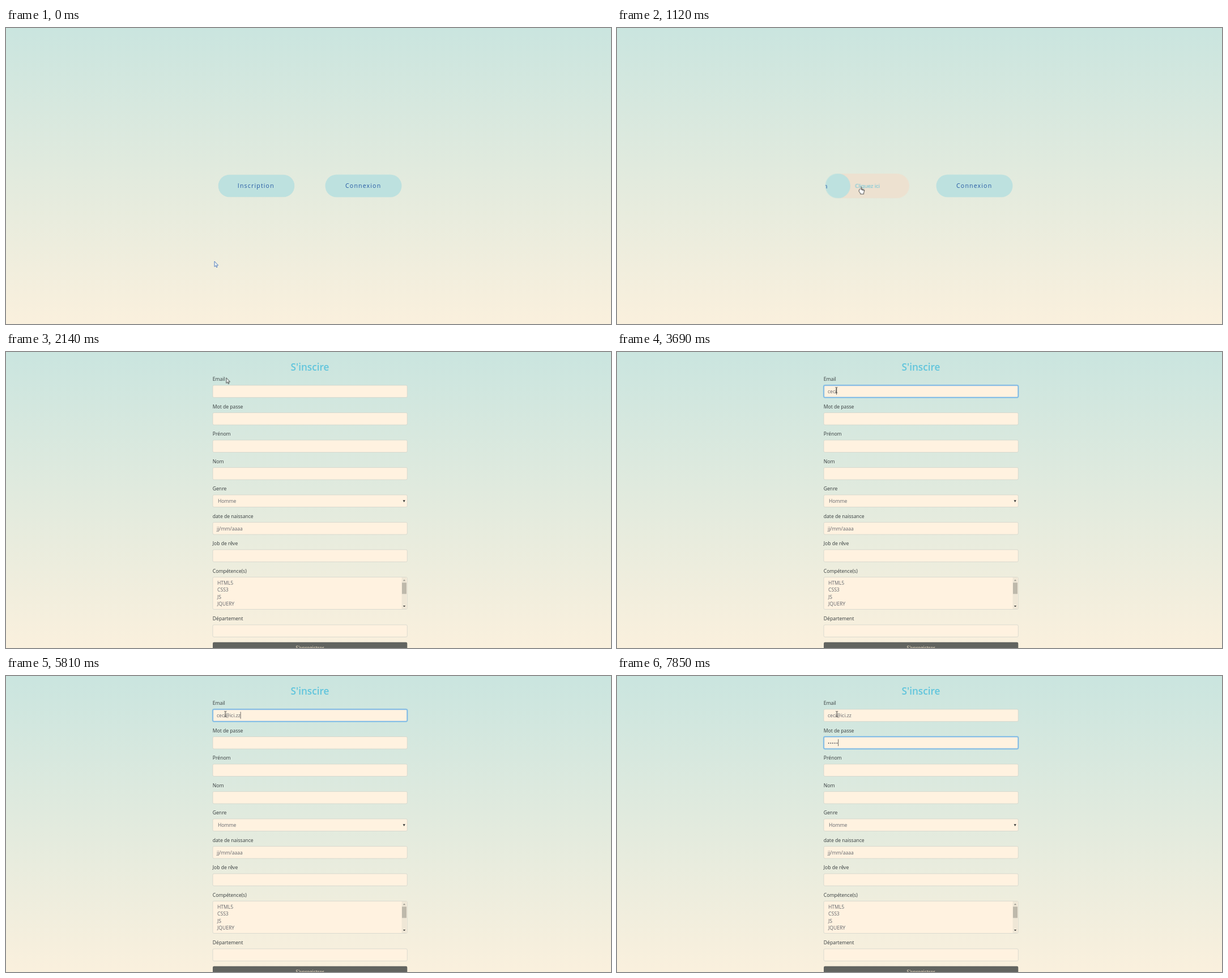
These frames come from a looping animation (1068x524 px, 8 s). An HTML page:

```html
<!DOCTYPE html>
<html lang="fr">
<head>
<meta charset="utf-8">
<title>Inscription</title>
<style>
  html, body { margin: 0; width: 100%; height: 100%; overflow: hidden; }
  body { background: linear-gradient(#cae5df, #faf0dd); }
  svg { display: block; width: 1068px; height: 524px; font: 8.6px "Open Sans", "Noto Sans", sans-serif; }

  #landing, #form, #arrow, #hand, #beam, #pointer { animation: 8s step-end infinite; }
  #landing { animation-name: leave; }
  #form { animation-name: enter; }
  @keyframes leave { 0% { opacity: 1 } 26.75%, 100% { opacity: 0 } }
  @keyframes enter { 0% { opacity: 0 } 26.75%, 100% { opacity: 1 } }

  .pill { fill: #bde1df; }
  .action { font-size: 10.6px; letter-spacing: 1.15px; fill: #2459a4; }
  .prompt { font-size: 8.9px; letter-spacing: -.12px; fill: #5fc4dc; text-anchor: middle; }
  #hover { transform-origin: 442px 279.5px; animation: grow 8s infinite; }
  #cover { animation: slide 8s infinite; }
  @keyframes grow {
    0%, 8.875% { transform: scale(1); animation-timing-function: ease }
    13.875%, 100% { transform: scale(1.1) }
  }
  @keyframes slide {
    0%, 8.875% { transform: translateX(0); animation-timing-function: ease }
    21.375%, 100% { transform: translateX(-136px) }
  }

  #pointer { animation-name: travel; }
  #arrow { animation-name: arrow; }
  #hand { animation-name: hand; }
  #beam { animation-name: beam; }
  @keyframes travel {
    0% { transform: translate(368px, 413px) }
    3.25% { transform: translate(368px, 413px); animation-timing-function: ease-in }
    8.75% { transform: translate(425px, 297px); animation-timing-function: ease-out }
    13.125% { transform: translate(431px, 281.5px) }
    23.75% { transform: translate(418px, 205px) }
    24.875% { transform: translate(399px, 100px) }
    26% { transform: translate(388.8px, 45.6px) }
    28.75% { transform: translate(387.3px, 57.5px) }
    30.75% { transform: translate(387.3px, 62.3px) }
    81.625%, 100% { transform: translate(388.1px, 62.3px) }
  }
  @keyframes arrow {
    0% { opacity: 1; stroke: #3464b4 }
    8.875% { opacity: 0; stroke: #222 }
    23.75% { opacity: 1; stroke: #222 }
    28.75%, 100% { opacity: 0; stroke: #222 }
  }
  @keyframes hand { 0% { opacity: 0 } 8.875% { opacity: 1 } 23.75%, 100% { opacity: 0 } }
  @keyframes beam { 0% { opacity: 0 } 28.75%, 100% { opacity: 1 } }

  .title { font-size: 17.2px; font-weight: 600; fill: #61c5dc; text-anchor: middle; }
  .label { fill: #343a3c; }
  .value { fill: #61646a; }
  .box { fill: #fff2e0; stroke: #cdd2c9; stroke-width: .7; }
  .ring { fill: none; stroke: #3d9bea; stroke-opacity: .38; stroke-width: 2.4; }
  .edge { fill: none; stroke: #72b5e9; stroke-width: 1; }
  .dots { letter-spacing: .43px; }
</style>
</head>
<body>
<svg viewBox="0 0 1068 524">
  <defs>
    <clipPath id="pillClip"><rect x="374.5" y="259.5" width="135" height="40" rx="20"/></clipPath>
  </defs>

  <g id="landing">
    <g id="hover">
      <g clip-path="url(#pillClip)">
        <rect x="374.5" y="259.5" width="135" height="40" rx="20" fill="#ede1d0"/>
        <text class="prompt" x="442" y="282.7">Cliquez ici</text>
        <g id="cover">
          <rect class="pill" x="374.5" y="259.5" width="135" height="40" rx="20"/>
          <text class="action" x="408.8" y="283.4">Inscription</text>
        </g>
      </g>
    </g>
    <rect class="pill" x="563.5" y="259.5" width="135" height="40" rx="20"/>
    <text class="action" x="599" y="283.4">Connexion</text>
  </g>

  <g id="form">
    <text class="title" x="536.5" y="33.2">S'inscire</text>
    <g id="rows"></g>
    <path d="M700.6 262.3h4.2l-2.1 3.8z" fill="#333"/>
    <g id="skills"></g>
    <rect x="698.5" y="399" width="9" height="56" fill="#efe7d6"/>
    <rect x="699" y="408.3" width="8" height="20" fill="#beb9ab"/>
    <path d="M700.8 405.2h4.4l-2.2-2.4z" fill="#99968c"/>
    <path d="M700.8 448.9h4.4l-2.2 2.4z" fill="#333"/>
    <rect x="365" y="513.8" width="343.3" height="22" rx="2.2" fill="#626460"/>
    <text x="536.5" y="527" text-anchor="middle" fill="#fbecd0">S'enregistrer</text>
    <g id="typing"></g>
  </g>

  <g id="pointer">
    <path id="arrow" d="M0 0V9.6L2.2 7.6 3.6 10.8 5 10.2 3.7 7.1H6.6Z" fill="#eef4f2" stroke-width=".8"/>
    <path id="hand" d="M-1 .8Q0-.6 1 .8V5L4.4 5.6Q5.6 5.9 5.4 7.2L4.6 10.4V12.4H-1.4V11L-4 7.6Q-4-.1 6.4 6-2.6 6.2L-1 7.6Z" fill="#fff" stroke="#222" stroke-width=".8"/>
    <path id="beam" d="M-2 .3Q0 .3 0 1.3V9Q0 10 2 10M2 .3Q0 .3 0 1.3M-2 10Q0 10 0 9" fill="none" stroke="#333" stroke-width=".9"/>
  </g>
</svg>
<script>
  const LOOP = 8000, BLINK = 550, PITCH = 48.5, TOP = 59;

  function add(parent, tag, attrs, text = '') {
    const node = document.createElementNS('http://www.w3.org/2000/svg', tag);
    for (const name in attrs) node.setAttribute(name, attrs[name]);
    node.textContent = text;
    return document.getElementById(parent).appendChild(node);
  }

  function frame(parent, cls, y, height = 21.5) {
    return add(parent, 'rect', { class: cls, x: 365, y, width: 343.3, height, rx: 2.2 });
  }

  function row(label, y, height) {
    add('rows', 'text', { class: 'label', x: 364.8, y: y - 7.8 }, label);
    frame('rows', 'box', y, height);
  }

  ['Email', 'Mot de passe', 'Prénom', 'Nom', 'Genre', 'date de naissance', 'Job de rêve']
    .forEach((label, i) => row(label, TOP + i * PITCH));
  row('Compétence(s)', 398.5, 57);
  row('Département', 483);
  add('rows', 'text', { class: 'value', x: 374, y: 267.3 }, 'Homme');
  add('rows', 'text', { class: 'value', x: 372, y: 315.7 }, 'jj/mm/aaaa');
  ['HTML5', 'CSS3', 'JS', 'JQUERY'].forEach((skill, i) =>
    add('skills', 'text', { class: 'value', x: 373, y: 411.8 + i * 12.45 }, skill));

  // Times are in ms: ring appears, caret starts, focus leaves, then one per key press.
  const fields = [
    { y: TOP, text: 'ceci@ici.zz', focus: 2440, caretAt: 2610, blur: 6200,
      keys: [3310, 3460, 3610, 3690, 4250, 4550, 4620, 4790, 5490, 5640, 5810] },
    { y: TOP + PITCH, text: '•••••', focus: 6200, caretAt: 6210, blur: LOOP,
      keys: [7080, 7250, 7400, 7620, 7850], cls: ' dots' }
  ];

  for (const f of fields) {
    f.rings = ['ring', 'edge'].map(cls => frame('typing', cls, f.y));
    f.node = add('typing', 'text', { class: 'value' + (f.cls || ''), x: 372, y: f.y + 14.2 });
    f.caret = add('typing', 'rect', { y: f.y + 4.4, width: .8, height: 12.2, fill: '#444' });
  }

  const ramp = (t, start, span) => Math.min(1, Math.max(0, (t - start) / span));

  function draw(t) {
    for (const f of fields) {
      const pressed = f.keys.filter(key => key <= t);
      const shown = f.text.slice(0, pressed.length);
      if (f.node.textContent !== shown) f.node.textContent = shown;

      const glow = ramp(t, f.focus, 190) - ramp(t, f.blur, 100);
      f.rings.forEach(ring => ring.setAttribute('opacity', Math.max(0, glow)));

      const since = t - (pressed.at(-1) ?? f.caretAt);
      const lit = t >= f.caretAt && t < f.blur && since % (2 * BLINK) < BLINK;
      f.caret.setAttribute('opacity', lit ? 1 : 0);
      f.caret.setAttribute('x', 372 + (shown ? f.node.getComputedTextLength() : 0));
    }
  }

  let start;
  function tick(now) {
    start ??= now;
    draw((now - start) % LOOP);
    requestAnimationFrame(tick);
  }
  requestAnimationFrame(tick);
</script>
</body>
</html>
```
